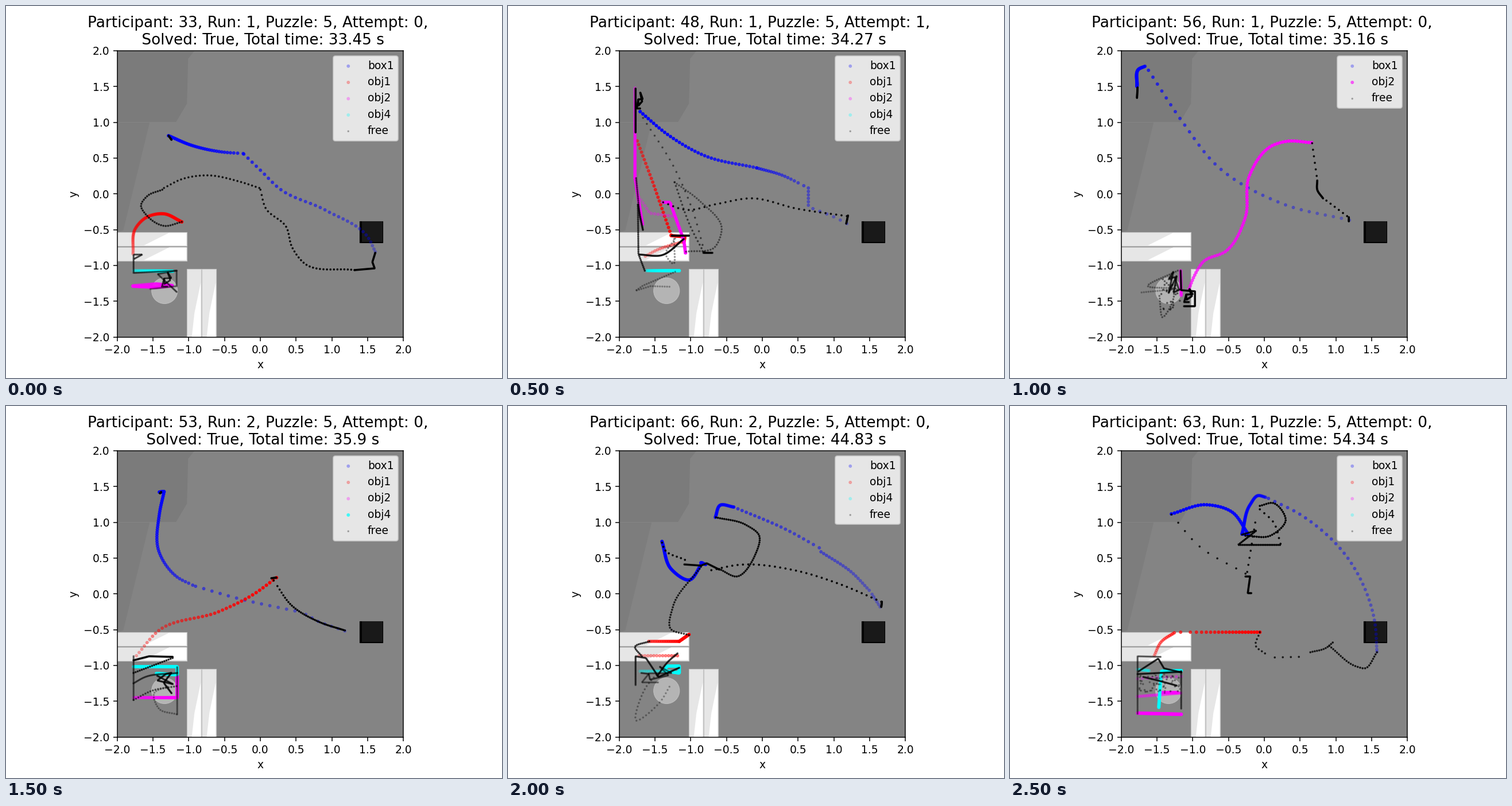
Recreate the animation shown at these times as a matplotlib script. Size 864 by 648 pixels, loop 3000 ms.

```python
import numpy as np
import matplotlib.pyplot as plt
from matplotlib.animation import FuncAnimation
from matplotlib.patches import Circle, Polygon

plt.rcParams["font.family"] = "DejaVu Sans"
SCALE, CX, CY = 124.74, 442.8, 327.24   # stage pixels per unit and the origin
COLORS = {"box1": (0, 0, 1), "obj1": (1, 0, 0), "obj2": (1, 0, 1),
          "obj4": (0, 1, 1), "free": (0, 0, 0)}


def unit(points):
    x, y = np.asarray(points, float).T
    return np.column_stack([(x - CX) / SCALE, (CY - y) / SCALE])


def lengths(p):
    return np.append(0, np.cumsum(np.hypot(*np.diff(p, axis=0).T)))


def spread(n, p, ease):
    """n dots along a polyline; ease > 1 crowds its start, < 1 its end."""
    s = lengths(p)
    u = s[-1] * np.linspace(0, 1, n) ** ease
    return np.column_stack([np.interp(u, s, c) for c in p.T])


def line(n, *xy, ease=1):
    return spread(n, np.reshape(xy, (-1, 2)), ease)


def curve(n, *xy, ease=1):
    """n dots on a smooth curve through a few key points."""
    p = np.reshape(xy, (-1, 2)).astype(float)
    s = lengths(p)
    slope = np.gradient(p, s, axis=0)
    u = np.linspace(0, s[-1], 300)
    k = np.clip(np.searchsorted(s, u) - 1, 0, len(p) - 2)
    h = (s[k + 1] - s[k])[:, None]
    t = (u - s[k])[:, None] / h
    fine = (p[k] + (p[k + 1] - p[k]) * t * t * (3 - 2 * t)
            + h * t * (1 - t) * (slope[k] * (1 - t) - slope[k + 1] * t))
    return spread(n, fine, ease)


def cloud(n, x0, y0, x1, y1, seed=1):
    return np.random.default_rng(seed).uniform((x0, y0), (x1, y1), (n, 2))


def wander(n, *box, seed=1, turns=8):
    """n dots along straight legs between random points of a box."""
    return spread(n, cloud(turns, *box, seed=seed), 1)


RUNS = [
    dict(head=(33, 1, 0, "33.45"),
         box1=[curve(34, 643, 428, 631, 404, 557, 356, 476, 318, 445, 288,
                     414, 258, ease=1.15),
               curve(34, 413, 257, 374, 254, 321, 242, 283, 226, ease=.75)],
         obj1=[curve(50, 221, 432, 225, 388, 243, 369, 275, 362, 306, 376)],
         obj2=[line(80, 221, 487, 262, 484, 290, 487, 262, 490, 221, 488)],
         obj4=[line(35, 222, 461, 290, 462)],
         free=[line(70, 251, 493, 297, 488, 297, 461, 264, 467, 297, 498),
               line(50, 297, 461, 222, 465, 222, 433, 237, 433, 224, 440),
               wander(30, 268, 463, 292, 490),
               curve(34, 306, 376, 275, 383, 247, 367, 235, 347, 246, 331,
                     272, 320),
               curve(27, 275, 317, 305, 302, 349, 295, 407, 306, 441, 317),
               curve(38, 443, 320, 452, 352, 488, 385, 498, 420, 518, 447,
                     607, 460, ease=.9),
               line(34, 607, 460, 642, 457, 638, 446, 643, 430),
               line(8, 283, 226, 288, 233)]),

    dict(head=(48, 1, 1, "34.27"),
         box1=[curve(6, 590, 379, 573, 370, 531, 353),
               line(6, 523, 347, 523, 317),
               curve(17, 515, 313, 478, 295, 433, 282, ease=.75),
               curve(38, 433, 282, 343, 261, 278, 224, 230, 184)],
         obj1=[curve(16, 239, 436, 255, 427, 306, 410),
               line(26, 225, 235, 252, 307, 284, 399),
               line(14, 284, 400, 308, 402, 306, 412)],
         obj2=[line(13, 228, 333, 247, 361, 285, 366),
               line(60, 221, 143, 221, 300), line(24, 221, 300, 234, 380),
               line(30, 270, 342, 282, 342, 306, 408, 309, 430)],
         obj4=[line(50, 241, 461, 298, 461)],
         free=[line(34, 281, 489, 248, 488, 222, 496, 235, 487, 291, 463),
               curve(20, 291, 405, 275, 434, 287, 449, 289, 406),
               curve(44, 290, 307, 333, 339, 372, 388, 360, 420, 310, 428),
               curve(22, 235, 195, 289, 281, 322, 358, 342, 428),
               curve(20, 290, 307, 318, 385, 340, 428),
               line(20, 340, 430, 356, 430),
               line(80, 223, 300, 229, 365, 235, 391, 226, 345, 227, 432,
                    238, 461),
               curve(46, 229, 433, 268, 434, 306, 406),
               line(28, 285, 400, 315, 400),
               curve(36, 270, 342, 309, 355, 363, 345, 424, 335, 503, 353,
                     590, 366),
               line(12, 592, 365, 589, 379), line(40, 222, 144, 222, 220),
               wander(36, 222, 150, 237, 180)]),

    dict(head=(56, 1, 0, "35.16"), faint={"obj2": .5},
         box1=[curve(33, 591, 373, 476, 345, 361, 279, 301, 203, 241, 112),
               curve(34, 235, 105, 224, 110, 221, 140)],
         obj2=[line(18, 297, 461, 298, 504),
               curve(76, 312, 492, 320, 472, 337, 445, 376, 427, 410, 367,
                     416, 298, 457, 243, 480, 236, 525, 238)],
         free=[curve(44, 229, 499, 290, 492, 240, 488, 292, 461),
               curve(26, 260, 505, 265, 542, 285, 498, 266, 476),
               cloud(24, 262, 470, 297, 530),
               wander(70, 275, 461, 298, 500, seed=5),
               line(70, 297, 461, 298, 495, 322, 497, 322, 523, 303, 523),
               wander(40, 300, 492, 322, 517),
               line(6, 526, 239, 534, 296),
               curve(26, 535, 304, 535, 320, 545, 335),
               line(6, 551, 339, 587, 366), line(6, 590, 368, 590, 375),
               line(18, 222, 142, 221, 160)]),

    dict(head=(53, 2, 0, "35.9"), faint={"obj4": .6},
         box1=[line(7, 590, 392, 545, 376, 522, 363),
               curve(13, 503, 357, 403, 335, 330, 314),
               curve(44, 325, 312, 298, 298, 266, 253, 267, 188, 275, 150,
                     ease=.85),
               line(10, 275, 149, 267, 150)],
         obj1=[curve(40, 227, 435, 266, 391, 371, 358, 431, 328, 471, 299)],
         obj2=[line(70, 222, 508, 298, 508, 298, 470)],
         obj4=[line(80, 222, 454, 298, 454, 298, 468, 262, 466)],
         free=[curve(22, 281, 489, 258, 500, 267, 528, 297, 537),
               line(36, 298, 537, 298, 455), line(30, 222, 512, 222, 436),
               curve(18, 222, 512, 254, 496, 297, 488),
               curve(30, 222, 483, 240, 473, 298, 465),
               wander(60, 260, 460, 298, 502, seed=3),
               line(20, 222, 465, 290, 439),
               line(44, 222, 443, 249, 436, 290, 437),
               line(12, 471, 299, 462, 300),
               curve(42, 466, 304, 498, 348, 545, 376, 590, 391, ease=.7),
               line(8, 268, 152, 270, 150)]),

    dict(head=(66, 2, 0, "44.83"),
         box1=[line(6, 648, 350, 634, 328),
               curve(20, 629, 321, 600, 291, 545, 254),
               curve(20, 542, 247, 486, 216, 393, 176, ease=.9),
               curve(32, 393, 176, 369, 173, 361, 194),
               curve(56, 338, 273, 316, 303, 284, 284, 268, 236),
               line(6, 336, 273, 344, 276)],
         obj1=[line(14, 228, 435, 295, 435), line(18, 245, 410, 298, 410),
               line(12, 298, 410, 315, 398)],
         obj4=[line(14, 230, 462, 272, 462),
               line(60, 272, 461, 277, 453, 298, 453, 298, 465, 277, 462)],
         free=[curve(28, 281, 489, 266, 514, 223, 548, 240, 490, 258, 468),
               wander(80, 222, 453, 298, 483, turns=9),
               line(80, 222, 486, 222, 436, 240, 439, 262, 472, 298, 456),
               curve(24, 295, 431, 278, 446, 260, 470),
               curve(16, 233, 436, 221, 420, 246, 410),
               curve(36, 315, 399, 283, 388, 287, 350, 336, 280),
               line(40, 307, 276, 336, 278, 346, 274, 368, 285),
               curve(56, 368, 284, 398, 297, 430, 260, 437, 225, 414, 207,
                     362, 194),
               curve(8, 268, 238, 272, 249, 308, 268),
               curve(34, 354, 286, 399, 277, 498, 286, 577, 310, 650, 341),
               line(12, 651, 341, 650, 350)]),

    dict(head=(63, 1, 0, "54.34"),
         box1=[curve(36, 639, 428, 635, 375, 589, 266, 507, 190, 450, 161,
                     ease=1.25),
               curve(48, 445, 159, 432, 156, 418, 172, 404, 223),
               line(6, 404, 223, 415, 224),
               curve(36, 414, 222, 387, 185, 342, 172, 281, 188, ease=1.25)],
         obj1=[curve(18, 251, 435, 263, 411, 286, 395),
               line(21, 297, 394, 435, 394, ease=.7)],
         obj2=[line(10, 222, 475, 298, 471), line(24, 222, 506, 297, 500),
               line(20, 264, 499, 292, 499), line(60, 222, 535, 298, 537)],
         obj4=[line(10, 222, 459, 242, 461), line(44, 263, 464, 259, 525),
               line(24, 264, 462, 298, 461)],
         free=[cloud(60, 225, 466, 296, 500, seed=7),
               line(60, 222, 536, 222, 436, 262, 437),
               line(26, 298, 527, 298, 462), line(44, 222, 467, 298, 463),
               line(30, 232, 472, 257, 478, 290, 487),
               line(40, 224, 462, 258, 440, 268, 457, 298, 464),
               curve(8, 435, 394, 428, 418, 444, 431),
               line(4, 461, 438, 503, 437),
               curve(12, 523, 429, 551, 421, 562, 412),
               curve(26, 556, 418, 604, 454, 617, 457, 639, 429),
               curve(10, 281, 189, 328, 243, 410, 292),
               line(28, 410, 297, 418, 297, 414, 326, 420, 326),
               curve(8, 413, 289, 427, 203),
               line(46, 404, 224, 429, 217, 397, 242, 470, 242),
               curve(8, 471, 240, 459, 203, 435, 180),
               curve(38, 435, 174, 458, 169, 480, 199, 453, 226, 410, 226)]),
]

fig, ax = plt.subplots(figsize=(6.4, 4.8), dpi=135)
fig.subplots_adjust(left=.1255)
ax.set(xlim=(-2, 2), ylim=(-2, 2), aspect="equal", xlabel="x", ylabel="y",
       xticks=np.arange(-2, 2.1, .5), yticks=np.arange(-2, 2.1, .5),
       facecolor="#848484")


def shape(color, *xy, edge="none"):
    ax.add_patch(Polygon(unit(np.reshape(xy, (-1, 2))), fc=color, ec=edge,
                         lw=.6, joinstyle="round", zorder=.5))


def block(color, x0, y0, x1, y1, edge="none"):
    shape(color, x0, y0, x1, y0, x1, y1, x0, y1, edge=edge)


def draw_scene():
    shape("#7b7b7b", 193, 78, 328, 78, 317, 92, 315, 170, 296, 202, 193, 202)
    shape("#7d7d7d", 193, 203, 250, 203, 204, 391, 193, 394)
    block("#787878", 193, 201.5, 316, 202.5)
    for y in 394, 419.5:
        block("#e6e6e6", 190, y, 315, y + 24, edge="#c4c4c4")
        shape("white", 240, y + 23, 284, y + 1, 314, y + 1, 314, y + 23)
    for x in 315, 341:
        block("#e6e6e6", x, 458, x + 25, 580, edge="#c4c4c4")
        shape("white", x + 8, 580, x + 13, 535, x + 24, 482, x + 24, 580)
    ax.add_patch(Circle(unit([(276, 496)])[0], 22.5 / SCALE, fc="#b4b4b4",
                        ec="#bebebe", lw=.6, zorder=.5))
    block("black", 616, 375, 656, 412, edge="black")
    block("#191919", 620, 375, 656, 411)


def draw_run(i):
    run = RUNS[i]
    for dots in list(ax.collections):
        dots.remove()
    for name, rgb in COLORS.items():
        if name not in run:
            continue
        xy = unit(np.vstack(run[name]))
        rgba = np.empty((len(xy), 4))
        rgba[:, :3] = rgb
        rgba[:, 3] = np.linspace(run.get("faint", {}).get(name, .22), 1, len(xy))
        ax.scatter(*xy.T, s=1 if name == "free" else 5, c=rgba, label=name)
    ax.legend(loc="upper right")
    who, rnd, attempt, total = run["head"]
    ax.set_title(f"Participant: {who}, Run: {rnd}, Puzzle: 5, Attempt: {attempt}, \n"
                 f" Solved: True, Total time: {total} s", fontsize=14)


draw_scene()
anim = FuncAnimation(fig, draw_run, frames=len(RUNS), interval=500,
                     repeat=True, repeat_delay=0)
plt.show()
```
